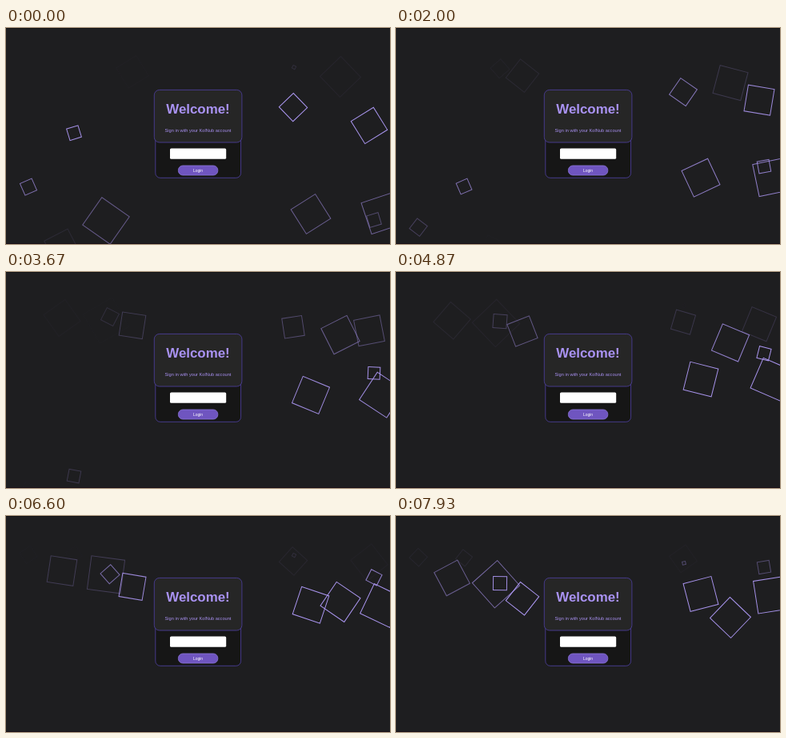
Animation, 480 px wide and 270 px high, one loop 8000 ms. Source, as an HTML page:

```html
<!DOCTYPE html>
<html lang="en">
<head>
<meta charset="utf-8">
<title>Welcome</title>
<style>
  html, body { margin: 0; width: 100%; height: 100%; overflow: hidden; background: #1e1e20; }
  svg { display: block; width: 100vw; height: 100vh; }
  text { font-family: "Liberation Sans", Arial, sans-serif; text-anchor: middle; }
  .panel { stroke: #4b3e97; stroke-width: .9; }
</style>
</head>
<body>
<svg viewBox="0 0 480 270">
  <rect width="480" height="270" fill="#1e1e20"/>
  <rect width="480" height="1" fill="#131315"/>
  <rect y="269" width="480" height="1" fill="#1a1017"/>
  <g id="squares" fill="none" stroke="#ac97f2"></g>

  <rect class="panel" x="186.8" y="110" width="106.8" height="77.3" rx="6" fill="#161616"/>
  <rect class="panel" x="185.3" y="77.4" width="109.6" height="65.6" rx="6.5" fill="#262626"/>
  <text x="240" y="107" font-size="16.9" font-weight="700" fill="#a992f3">Welcome!</text>
  <text x="240" y="130.4" font-size="5.65" fill="#a78ff0">Sign in with your KolNub account</text>
  <rect x="205" y="150.4" width="70.2" height="13.4" rx="1.6" fill="#fff"/>
  <rect x="215.4" y="172" width="49.4" height="12" rx="5.6" fill="#6f55c0" stroke="#8c76d8" stroke-width=".8"/>
  <text x="240" y="179.6" font-size="5" fill="#fff">Login</text>
</svg>
<script>
const LOOP = 8;            // seconds
const TOP = 38.4;          // upper edge of a square at its highest point
const TRAVEL = 230;
const TURN = 4.13;         // degrees per pixel of travel
const TOP_ANGLE = 65;

// CSS "ease": cubic-bezier(.25, .1, .25, 1)
function ease(x) {
  if (x <= 0) return 0;
  if (x >= 1) return 1;
  let lo = 0, hi = 1, s;
  for (let i = 0; i < 24; i++) {
    s = (lo + hi) / 2;
    if (.75 * s * (1 - s) + s ** 3 < x) lo = s; else hi = s;
  }
  return .3 * s * (1 - s) ** 2 + 3 * s * s * (1 - s) + s ** 3;
}

const group = document.getElementById("squares");
const squares = [];

// `depth(t)` runs from 0 at the top to 1 at the bottom
function add(x, side, depth) {
  const el = document.createElementNS("http://www.w3.org/2000/svg", "rect");
  const attrs = { x: -side / 2, y: -side / 2, width: side, height: side };
  for (const name in attrs) el.setAttribute(name, attrs[name]);
  group.append(el);
  squares.push({ el, x, side, depth });
}

// Falls again and again, leaving the top at `start`
function fall(x, side, start, span) {
  add(x, side, t => {
    const turns = (t - start) / span;
    return turns - Math.floor(turns);
  });
}

// Climbs, reaches the top at `peak`, then sinks the same way
function swing(x, side, peak, span) {
  add(x, side, t => Math.abs(t - peak) / span);
}

fall(28, 16, 4.2, 19.2);
fall(70, 33, 1.2, 18);
fall(85, 15, 5, 13.7);
fall(125, 42, 2.3, 14.2);
fall(130, 17, -1.4, 20.2);
fall(158, 29.5, -2.15, 19.4);
swing(359, 25, 10.8, 21.1);
swing(360, 4, 3.3, 13.5);
swing(381, 36, 18.9, 22.85);
swing(418, 36, -3.5, 19.3);
swing(454, 33, 8.95, 15.4);
swing(460, 15, 13.06, 15.1);
swing(470, 41, 18.75, 22.85);

function draw(t) {
  for (const { el, x, side, depth } of squares) {
    const q = depth(t);
    const drop = TRAVEL * (1 - ease(1 - q));
    const alpha = q < .5 ? 1 - ease(1 - 2 * q) : ease(2 - 2 * q);
    el.setAttribute("transform",
      `translate(${x} ${TOP + side / 2 + drop}) rotate(${TOP_ANGLE - TURN * drop})`);
    el.setAttribute("opacity", alpha ** 1.2);
  }
}

const start = performance.now();
function tick() {
  draw((performance.now() - start) / 1000 % LOOP);
  requestAnimationFrame(tick);
}
tick();
</script>
</body>
</html>
```
